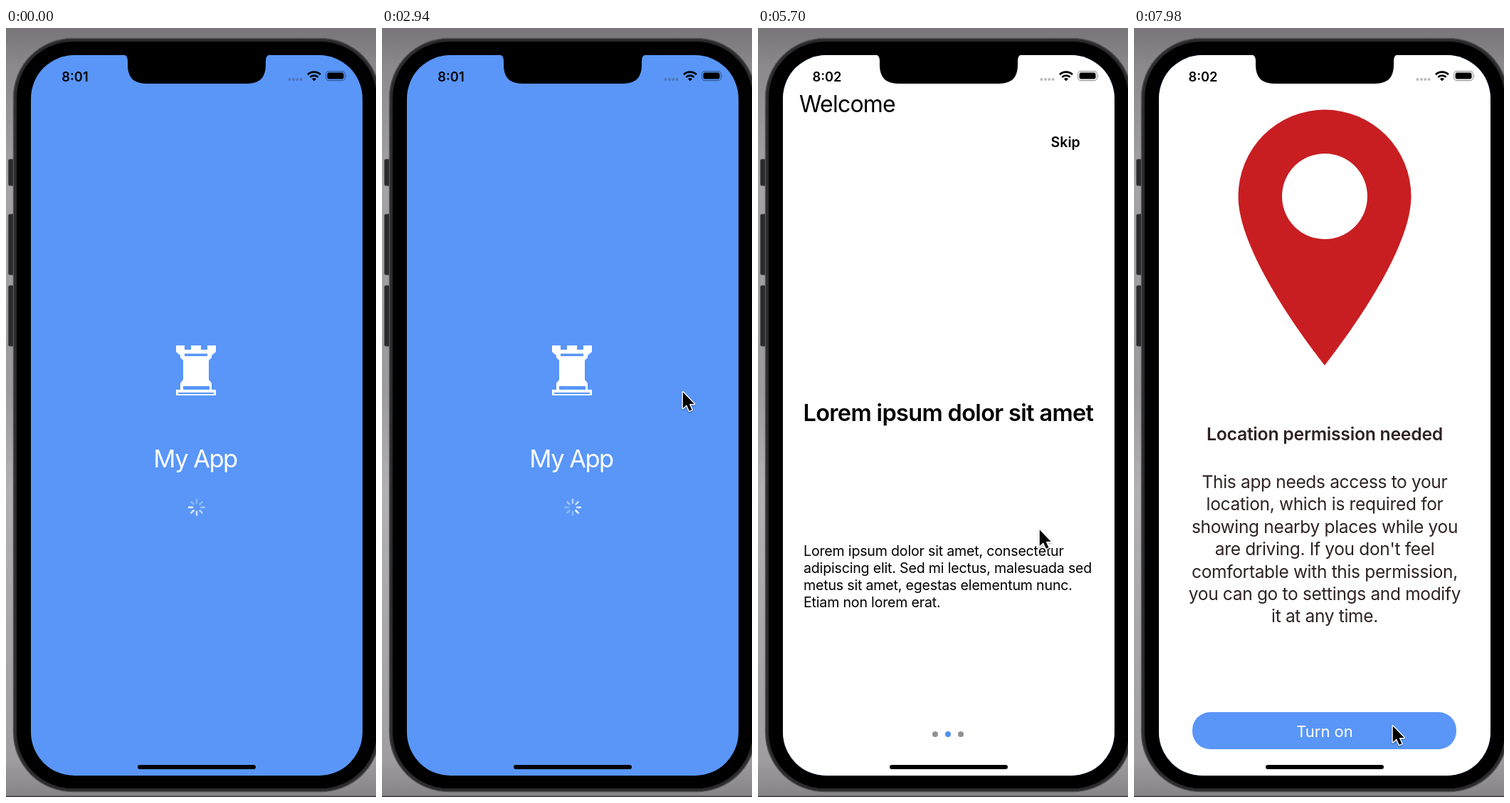
Animation of 520x1078 px, one loop 8 s. Source, as an HTML page:

```html
<!DOCTYPE html>
<html lang="en">
<head>
<meta charset="utf-8">
<title>App onboarding</title>
<style>
html, body { margin: 0; width: 100%; height: 100%; overflow: hidden; background: #8b898b; }
svg { display: block; width: 520px; height: 1078px; }
text { font-family: Inter, "Liberation Sans", sans-serif; font-optical-sizing: none; white-space: pre; }
.bold { font-weight: 600; }
.mid { text-anchor: middle; }
</style>
</head>
<body>
<svg viewBox="0 0 520 1078">
  <defs>
    <linearGradient id="wall" x2="0" y2="1">
      <stop offset="0" stop-color="#777577"/>
      <stop offset=".05" stop-color="#8b898b"/>
      <stop offset=".2" stop-color="#a5a3a5"/>
      <stop offset=".47" stop-color="#9c9a9c"/>
      <stop offset=".6" stop-color="#b2b0b2"/>
      <stop offset=".95" stop-color="#a09ea0"/>
      <stop offset="1" stop-color="#858385"/>
    </linearGradient>
    <clipPath id="screen"><rect x="35" y="38" width="466" height="1010" rx="61"/></clipPath>
    <filter id="shade" x="-50%" y="-50%" width="200%" height="200%">
      <feDropShadow dx="0" dy="1.5" stdDeviation="1.2" flood-opacity=".35"/>
    </filter>
  </defs>

  <rect width="520" height="1078" fill="url(#wall)"/>
  <rect y="1076.5" width="520" height="1.5" fill="#3c3b3d"/>
  <g fill="#2b2a2c" stroke="#4b4a4c">
    <rect x="3.5" y="184" width="9" height="37" rx="2"/>
    <rect x="3.5" y="261" width="9" height="85" rx="2"/>
    <rect x="3.5" y="361" width="9" height="85" rx="2"/>
  </g>
  <rect x="10.5" y="14.5" width="515" height="1056" rx="83" fill="#2b2a2c" stroke="#555356" stroke-width="1.5"/>
  <rect x="15" y="19" width="506" height="1047" rx="79"/>

  <g clip-path="url(#screen)">
    <rect x="35" y="38" width="466" height="1010" fill="#5996f8"/>
    <g fill="#fff">
      <path fill-rule="evenodd" d="M239 445h12v6h9v-6h14v6h9v-6h12v9l-6 5v3l-4 4v27l4 5v9h6v8h-56v-8h6v-9l4-5v-27l-4-4v-3l-6-5zM251 456.5v3.5h32v-3.5zM249 502v5h37v-5zM242 511v2h50v-2z"/>
      <text class="mid" x="266" y="616" font-size="34.5" letter-spacing="-.044em">My App</text>
    </g>
    <g id="spinner" stroke="#fff" stroke-width="2.7" stroke-linecap="round"></g>

    <g id="welcome">
      <rect x="35" y="38" width="466" height="1040" fill="#fff"/>
      <g id="intro">
        <text x="58" y="118" font-size="32" letter-spacing="-.025em">Welcome</text>
        <text class="bold" x="411.5" y="167" font-size="19.6">Skip</text>
        <g id="pages"></g>
        <g id="dots"></g>
      </g>
    </g>

    <g id="location">
      <rect x="35" y="38" width="466" height="1040" fill="#fff"/>
      <path fill="#c81e22" fill-rule="evenodd" d="M268 473C222 414 146.5 305 146.5 236A121.5 121.5 0 0 1 389.5 236C389.5 305 314 414 268 473zM208 236a60 60 0 0 0 120 0a60 60 0 0 0-120 0z"/>
      <g class="mid" fill="#2f2223">
        <text class="bold" x="268" y="577.5" font-size="24.8" letter-spacing="-.011em">Location permission needed</text>
        <g id="reason" font-size="24.5" letter-spacing="-.0135em"></g>
      </g>
      <rect x="82" y="959" width="371" height="52" rx="25" fill="#5996f8"/>
      <text class="mid" x="268" y="993.5" font-size="22" fill="#fff">Turn on</text>
    </g>
  </g>

  <path d="M163 37q8 0 8 9v6q0 26 26 26h142q26 0 26-26v-6q0-9 8-9z"/>
  <text id="clock" class="bold mid" x="97" y="74.5" font-size="18.3"></text>
  <g fill="#3c3c43" fill-opacity=".35">
    <circle cx="398.5" cy="72" r="2"/><circle cx="404" cy="72" r="2"/>
    <circle cx="409.3" cy="72" r="2"/><circle cx="414.6" cy="72" r="2"/>
  </g>
  <g fill="none" stroke="#000" stroke-width="2.6">
    <path d="M424 65.2a13 13 0 0 1 18 0M427.3 68.9a8.3 8.3 0 0 1 11.4 0"/>
    <path d="M433 74.5l-3-3.2a4.5 4.5 0 0 1 6 0z" fill="#000" stroke="none"/>
  </g>
  <rect x="449.6" y="60.6" width="27" height="13" rx="4" fill="none" stroke="#000" stroke-opacity=".4" stroke-width="1.1"/>
  <rect x="451.6" y="62.6" width="23" height="9" rx="2.3"/>
  <path d="M478 65q1.7 2.2 0 4.4z" fill-opacity=".45"/>
  <rect x="185" y="1033" width="166" height="6" rx="3"/>

  <path id="cursor" d="M.8 1.5V24l5.2-4.8 3.8 8.6 3.6-1.6-3.7-8.2h7z" stroke="#fff" stroke-width="2.6" stroke-linejoin="round" paint-order="stroke" filter="url(#shade)"/>
</svg>
<script>
const LOOP = 8000, WIDTH = 466, HEIGHT = 1010;
const DRAG = 240, REACH = 300;
const SWIPES = [5100, 5820];
const $ = id => document.getElementById(id);
const clamp = v => Math.min(1, Math.max(0, v));
const ease = v => v * v * (3 - 2 * v);
const move = (el, x, y) => el.setAttribute('transform', `translate(${x.toFixed(2)} ${y.toFixed(2)})`);

const lines = (rows, x, y, step) =>
  rows.map((row, i) => `<text x="${x}" y="${y + i * step}">${row}</text>`).join('');

const story = [
  'Lorem ipsum dolor sit amet, consectetur',
  'adipiscing elit. Sed mi lectus, malesuada sed',
  'metus sit amet, egestas elementum nunc.',
  'Etiam non lorem erat.'
];
const page = `<text class="bold" x="58.5" y="550.5" font-size="32.5" letter-spacing="-.0204em">Lorem ipsum dolor sit amet</text>
  <g font-size="19.6" letter-spacing="-.0097em">${lines(story, 59, 740, 24.15)}</g>`;
$('pages').innerHTML = [0, 1, 2].map(i => `<g transform="translate(${i * WIDTH})">${page}</g>`).join('');
$('dots').innerHTML = [249, 267, 285].map(x => `<circle cx="${x}" cy="990" r="4"/>`).join('');
$('reason').innerHTML = lines([
  'This app needs access to your',
  'location, which is required for',
  'showing nearby places while you',
  "are driving. If you don't feel",
  'comfortable with this permission,',
  'you can go to settings and modify',
  'it at any time.'
], 268, 645, 31.4);
$('spinner').innerHTML = [...Array(8).keys()].map(i =>
  `<path d="M268 665.8v-4.6" transform="rotate(${i * 45} 268 672)"/>`).join('');

// time, x, y of the pointer
const trail = [
  [2440, 540, 372], [2580, 499, 401], [3100, 400, 540], [3660, 334, 619],
  [4320, 434, 650], [4800, 480, 700], [5100, 480, 700], [5340, 180, 702],
  [5700, 395, 702], [5820, 450, 706], [6060, 150, 712], [6220, 170, 740],
  [6660, 342, 984], [7140, 342, 984], [7800, 363, 977]
];

function pointer(t) {
  const n = trail.findIndex(k => k[0] > t);
  if (n < 1) return (n ? trail[trail.length - 1] : trail[0]).slice(1);
  const a = trail[n - 1], b = trail[n], f = ease((t - a[0]) / (b[0] - a[0]));
  return [a[1] + (b[1] - a[1]) * f, a[2] + (b[2] - a[2]) * f];
}

// follow the drag, then settle on the next page
function swipe(d) {
  const pulled = REACH / WIDTH;
  if (d < DRAG) return pulled * ease(clamp(d / DRAG));
  return 1 - (1 - pulled) * Math.exp((DRAG - d) / 103);
}

// critically damped spring
function spring(d, speed) {
  const w = Math.max(0, d) * speed;
  return 1 - (1 + w) * Math.exp(-w);
}

function draw(t) {
  $('clock').textContent = t < 3420 ? '8:01' : '8:02';

  const head = Math.floor(t / 100 + 6.4);
  [...$('spinner').children].forEach((spoke, i) => {
    const age = (head - i + 800) % 8;
    spoke.setAttribute('opacity', Math.max(.3, .95 - age * .13));
  });

  const leaving = t >= 6780;
  const shown = leaving ? 1 - spring(t - 6780, .01004) : spring(t - 3670, .0155);
  move($('welcome'), 0, HEIGHT * (1 - shown));
  $('intro').setAttribute('visibility', leaving ? 'hidden' : 'visible');

  const at = SWIPES.reduce((sum, start) => sum + swipe(t - start), 0);
  move($('pages'), -at * WIDTH, 0);
  [...$('dots').children].forEach((dot, i) =>
    dot.setAttribute('fill', i === Math.round(at) ? '#4f93f8' : '#929196'));

  const asked = spring(t - 7290, .0155);
  move($('location'), 0, asked > .997 ? 0 : HEIGHT * (1 - asked));
  move($('cursor'), ...pointer(t));
}

const begin = performance.now();
function tick() {
  draw((performance.now() - begin) % LOOP);
  requestAnimationFrame(tick);
}
tick();
</script>
</body>
</html>
```
